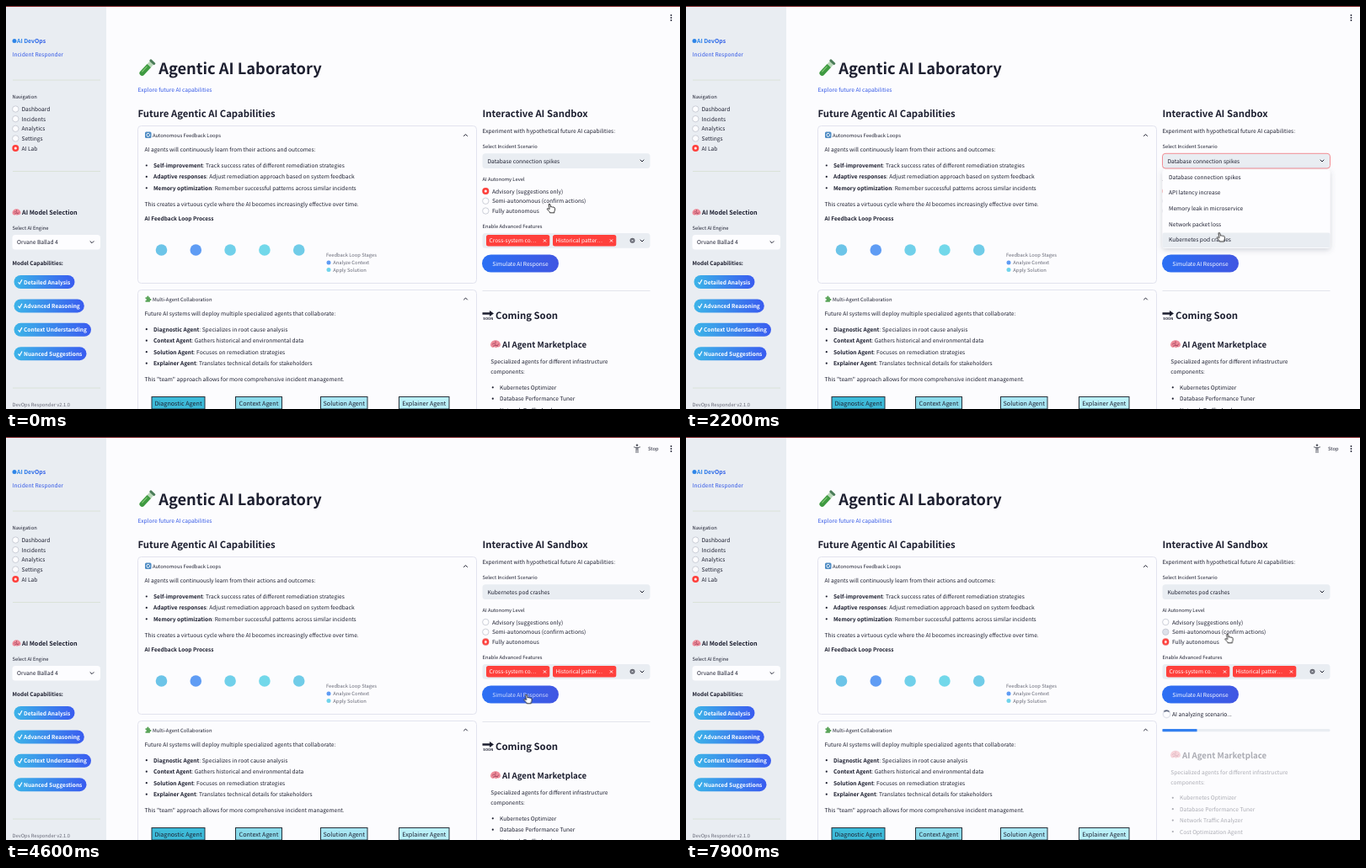
Animation, 800 px wide and 479 px high, one loop 8 s. Source, as an HTML page:

```html
<!DOCTYPE html>
<html lang="en">
<head>
<meta charset="utf-8">
<title>Agentic AI Laboratory</title>
<style>
html, body { margin: 0; height: 100%; overflow: hidden; background: #fcfcfe; }
svg { display: block; width: 100vw; height: 100vh; --s: 7.38; --k: var(--regular); }
text, tspan {
  font-family: "Noto Sans CJK JP", "Noto Sans CJK SC", "Noto Sans CJK", "Open Sans", sans-serif;
  font-size: calc(var(--s) * var(--k) * 1px);
  text-rendering: geometricPrecision;
  white-space: pre;
}
text { fill: #1d1f30; }
.b { font-weight: 700; --k: var(--bold); }
text.w { fill: #fff; }
text.link { fill: #3257e6; }
text.dim { fill: #666876; }
.mid { text-anchor: middle; }
.rule { stroke: #e3e5ec; stroke-width: 1; }
.rule.side { stroke: #dae2d8; }
.card { fill: none; stroke: #e2e3ee; }
.field { fill: #e9edf2; }
.line { fill: none; stroke: #1d1f30; stroke-width: 1; stroke-linecap: round; stroke-linejoin: round; }
.ring { fill: #fdfdff; stroke: #c0c4ce; stroke-width: .8; }

/* one shared 8 s timeline: 1% = 80 ms */
.step { animation: 8s step-end infinite; }
.menu { animation-name: menu; }
.focus { animation-name: focus; }
.before { animation-name: before; }
.after { animation-name: after; }
.caret { animation-name: caret; }
.last { animation-name: last; }
.first { animation-name: first; }
.pick { animation-name: pick; }
.hover { animation-name: hover; }
.stop { animation-name: stop; }
.person { animation-name: person; }
.bike { animation-name: bike; }
.press { animation-name: press; }
.divider { animation-name: divider; }
.coming { animation-name: coming; }
.market { animation-name: market; }
.busy { animation-name: busy; }
.bar { animation-name: bar; }
.arrow { animation-name: arrow; }
.hand { animation-name: hand; }
.stale { animation: stale 8s linear infinite; }
.fill { animation: fill 8s linear infinite; transform-box: fill-box; transform-origin: left; }
.spin { animation: spin .8s linear infinite; transform-box: view-box; transform-origin: 570.5px 329.5px; }
.cursor { animation: cursor 8s ease-in-out infinite; }

@keyframes menu { 0%, 33% { visibility: hidden } 7% { visibility: visible } }
@keyframes focus { 0%, 46% { visibility: hidden } 7% { visibility: visible } }
@keyframes before { 0% { visibility: visible } 33% { visibility: hidden } }
@keyframes after { 0% { visibility: hidden } 33% { visibility: visible } }
@keyframes caret { 0%, 13%, 25%, 39.5%, 46% { opacity: 0 } 7%, 19%, 31% { opacity: 1 } }
@keyframes first { 0% { opacity: 1 } 27% { opacity: 0 } }
@keyframes last { 0% { opacity: 0 } 27% { opacity: 1 } }
@keyframes pick { 0% { transform: none } 46% { transform: translateY(23.5px) } }
@keyframes hover { 0% { fill: #fdfdff } 94% { fill: #dde1ea } }
@keyframes stop { 0% { visibility: hidden } 55% { visibility: visible } }
@keyframes person { 0%, 74%, 90% { opacity: 1 } 64%, 80% { opacity: 0 } }
@keyframes bike { 0%, 74%, 90% { opacity: 0 } 64%, 80% { opacity: 1 } }
@keyframes press { 0%, 72% { opacity: 1 } 53% { opacity: .8 } }
@keyframes divider { 0% { visibility: visible } 63% { visibility: hidden } }
@keyframes coming {
  0% { transform: none }
  63% { transform: translateY(-30px) }
  72% { transform: translateY(-11.5px); visibility: visible }
  92% { transform: translateY(-11.5px); visibility: hidden }
}
@keyframes market {
  0% { transform: none }
  63% { transform: translateY(-30px) }
  72% { transform: translateY(-11px) }
  92% { transform: translateY(-24.5px) }
}
@keyframes stale { 0%, 77% { opacity: 1 } 81%, 100% { opacity: .36 } }
@keyframes busy { 0% { visibility: hidden } 72% { visibility: visible } }
@keyframes bar { 0% { visibility: hidden } 92% { visibility: visible } }
@keyframes fill { 0%, 92% { transform: scaleX(0) } 98.75% { transform: scaleX(.206) } 100% { transform: scaleX(.24) } }
@keyframes spin { to { transform: rotate(360deg) } }
@keyframes arrow { 0%, 43%, 74% { visibility: hidden } 33%, 62% { visibility: visible } }
@keyframes hand { 0%, 43%, 74% { visibility: visible } 33%, 62% { visibility: hidden } }
@keyframes cursor {
  0% { transform: translate(645px, 235px) }
  5%, 8% { transform: translate(690px, 186px) }
  20% { transform: translate(686px, 223px) }
  30%, 33% { transform: translate(625px, 276px) }
  38.75% { transform: translate(632px, 277px) }
  44%, 46% { transform: translate(604px, 242px) }
  52%, 58% { transform: translate(617.5px, 306px) }
  70% { transform: translate(624px, 263px) }
  83.75% { transform: translate(626px, 248px) }
  98.75% { transform: translate(642.5px, 234px) }
  100% { transform: translate(643px, 233px) }
}
</style>
</head>
<body>
<svg id="stage" viewBox="0 0 800 479" preserveAspectRatio="none"></svg>
<script>
const stage = document.getElementById('stage');

// Font scale per weight, so that sizes below are in the interface's own type size.
const pen = document.createElement('canvas').getContext('2d');
const family = '"Noto Sans CJK JP", "Noto Sans CJK SC", "Noto Sans CJK", "Open Sans", sans-serif';
function scale(weight, sample, ems) {
  pen.font = `${weight} 100px ${family}`;
  return ems * 100 / pen.measureText(sample).width;
}
stage.style.setProperty('--regular',
  scale(400, 'AI agents will continuously learn from their actions and outcomes:', 27.52));
stage.style.setProperty('--bold', scale(700, 'Agentic AI Laboratory', 9.435));

const INK = '#1d1f30', RED = '#ff403c', SMALL = 6.46;
const text = (x, y, str, size = 7.38, cls = '') =>
  `<text x="${x}" y="${y}" class="${cls}" style="--s:${size}">${str}</text>`;
const box = (x, y, w, h, r, attrs) =>
  `<rect x="${x}" y="${y}" width="${w}" height="${h}" rx="${r}" ${attrs}/>`;
const dot = (x, y, r, attrs = `fill="${INK}"`) => `<circle cx="${x}" cy="${y}" r="${r}" ${attrs}/>`;
const rule = (x, y, w, cls = '') => `<path class="rule ${cls}" d="M${x} ${y}h${w}"/>`;
const chevron = (x, y, dir = 1) =>
  `<path class="line" d="M${x - 2} ${y - dir}l2 ${2 * dir}l2 ${-2 * dir}"/>`;
const cross = (x, y, r, color) =>
  `<path d="M${x - r} ${y - r}l${2 * r} ${2 * r}m0 ${-2 * r}l${-2 * r} ${2 * r}" stroke="${color}" stroke-width=".9"/>`;
const ring = (x, y, cls = '') => dot(x, y, 3.7, `class="ring ${cls}"`);
const chosen = (x, y) => dot(x, y, 4, `fill="${RED}"`) + dot(x, y, 1.5, 'fill="#fff"');
const bullet = (x, y, lead, rest) =>
  dot(x - 8.2, y - 2.5, 1.1) + text(x, y, `<tspan class="b">${lead}</tspan>${rest}`);
const each = (list, fn) => list.map(fn).join('');
const step = (cls, body) => `<g class="step ${cls}">${body}</g>`;

const brain = (x, y, r) => `<g transform="translate(${x} ${y}) scale(${r / 6})">
  <path d="M-6 1C-6-3-3-5 0-5S6-3 6 1Q5 4 2 3Q1 5-1 3Q-5 5-6 1Z" fill="#ee8c9a"/>
  <path d="M-4 0Q-2-3 0 0T4-1M-3 2Q0 0 3 2M0-4V-1" fill="none" stroke="#a84a62" stroke-width=".9"/></g>`;

const defs = `<defs>
  <linearGradient id="badge"><stop stop-color="#3cb4e8"/><stop offset="1" stop-color="#3a5cf0"/></linearGradient>
  <linearGradient id="button"><stop stop-color="#2b70f4"/><stop offset="1" stop-color="#4056e2"/></linearGradient>
  <linearGradient id="brand"><stop stop-color="#2b8cec"/><stop offset="1" stop-color="#2c55e6"/></linearGradient>
  <filter id="shadow" x="-10%" y="-10%" width="120%" height="130%">
    <feDropShadow dx="0" dy="2" stdDeviation="3" flood-color="#50536a" flood-opacity=".25"/></filter>
</defs>`;

function sidebar() {
  const pages = ['Dashboard', 'Incidents', 'Analytics', 'Settings', 'AI Lab'];
  const badges = [['Detailed Analysis', 72], ['Advanced Reasoning', 83.3],
    ['Context Understanding', 91.5], ['Nuanced Suggestions', 86]];
  return box(0, 0, 119, 479, 0, 'class="field"')
    + dot(10, 41.5, 2.5, 'fill="#2f86e8"')
    + `<g>${text(13, 44, 'AI DevOps', 7.7, 'b').replace('--s', 'fill:url(#brand);--s')}</g>`
    + text(7.5, 60.3, 'Incident Responder', 7.38, 'link')
    + each([88, 196.5, 454], y => rule(8, y, 104, 'side'))
    + text(7.5, 110.3, 'Navigation', SMALL)
    + each(pages, (name, i) => {
        const y = 122.5 + i * 11.65;
        return (i < 4 ? ring(11.3, y) : chosen(11.3, y)) + text(18.5, y + 2.5, name);
      })
    + brain(12.5, 245.5, 5) + text(19, 248.4, 'AI Model Selection', 8.15, 'b')
    + text(7.5, 266, 'Select AI Engine', SMALL)
    + box(7.5, 272, 104.5, 17.5, 3.5, 'fill="#fdfdff"')
    + text(13, 283.2, 'Orvane Ballad 4') + chevron(102, 280.7)
    + text(7.5, 308, 'Model Capabilities:', 7.22, 'b')
    + each(badges, ([name, w], i) => {
        const y = 328 + i * 28.4;
        return box(9.5, y - 8, w, 16, 8, 'fill="url(#badge)"')
          + `<path d="M14.5 ${y + .3}l1.7 2l2.8-5" fill="none" stroke="#fff" stroke-width="1.2"/>`
          + text(21, y + 2.6, name, 7.4, 'b w');
      })
    + text(7.5, 476, 'DevOps Responder v2.1.0', SMALL, 'dim');
}

function capabilities() {
  const tube = `<g transform="translate(167 74) rotate(43)">
    <rect x="-3" y="-10" width="6" height="21" rx="3" fill="#b9d8b8"/>
    <path d="M-3-4H3V8a3 3 0 0 1-6 0Z" fill="#3f9a42"/>
    <rect x="-4" y="-11.5" width="8" height="3" rx="1" fill="#4a7c58"/>
    <path d="M-1.2-2V7" stroke="#8ed07c"/></g>`;
  const loop = `<rect x="165" y="149.5" width="7.5" height="7.5" rx="1.5" fill="#4f8cc4"/>
    <path d="M166.8 153.8a2 2 0 0 1 3.6-1.5M170.6 152.8a2 2 0 0 1-3.6 1.6" fill="none" stroke="#fff"/>`;
  const puzzle = `<path d="M165.5 346.3h1.8q-.5-1.7 1.1-1.7t1.1 1.7h1.4v1.8q1.6-.5 1.6.9t-1.6 1v1.8h-5.4v-1.8q1.4 0 1.4-1t-1.4-.9Z" fill="#5ba45a"/>`;
  const nodes = ['#6cc4e8', '#5f9cf4', '#70d0ea', '#72d8ea', '#70cce8'];
  const agents = [['Diagnostic', 173, 63, '#3dbbd9'], ['Context', 272.5, 55, '#8adaea'],
    ['Solution', 373.5, 55.5, '#a8e6f3'], ['Explainer', 466.5, 59.5, '#baf0f8']];
  return tube + text(181.2, 80.7, 'Agentic AI Laboratory', 20.53, 'b')
    + text(156.5, 102, 'Explore future AI capabilities', 7.38, 'link')
    + text(156.5, 131.9, 'Future Agentic AI Capabilities', 12.68, 'b')
    + box(156.5, 142.5, 402, 187, 4, 'class="card"')
    + loop + text(174, 155.7, 'Autonomous Feedback Loops', 6.55) + chevron(545.5, 153.5, -1)
    + text(164.5, 173, 'AI agents will continuously learn from their actions and outcomes:')
    + bullet(175, 192, 'Self-improvement', ': Track success rates of different remediation strategies')
    + bullet(175, 205.4, 'Adaptive responses', ': Adjust remediation approach based on system feedback')
    + bullet(175, 218.8, 'Memory optimization', ': Remember successful patterns across similar incidents')
    + text(164.5, 238.3, 'This creates a virtuous cycle where the AI becomes increasingly effective over time.')
    + text(164.5, 255.2, 'AI Feedback Loop Process', 7.3, 'b')
    + each(nodes, (c, i) => dot(184.5 + i * 40.8, 290, 6.8, `fill="${c}"`))
    + text(380, 298.4, 'Feedback Loop Stages', 6.45, 'dim')
    + dot(383, 305, 2.5, 'fill="#5f9cf4"') + text(388.3, 307.3, 'Analyze Context', 6.45, 'dim')
    + dot(383, 313.6, 2.5, 'fill="#70d4ec"') + text(388.3, 316, 'Apply Solution', 6.45, 'dim')
    + box(156.5, 337.5, 402, 160, 4, 'class="card"')
    + puzzle + text(174, 350.6, 'Multi-Agent Collaboration', 6.55) + chevron(545.5, 348, -1)
    + text(164.5, 368, 'Future AI systems will deploy multiple specialized agents that collaborate:')
    + bullet(175, 386.7, 'Diagnostic Agent', ': Specializes in root cause analysis')
    + bullet(175, 400.2, 'Context Agent', ': Gathers historical and environmental data')
    + bullet(175, 413.7, 'Solution Agent', ': Focuses on remediation strategies')
    + bullet(175, 427.2, 'Explainer Agent', ': Translates technical details for stakeholders')
    + text(164.5, 446.3, 'This "team" approach allows for more comprehensive incident management.')
    + each(agents, ([name, x, w, c]) =>
        box(x, 464.5, w, 14.5, 0, `fill="${c}" stroke="#26303a"`)
        + text(x + w / 2, 474.8, name + ' Agent', 8, 'mid'));
}

function sandbox() {
  const levels = ['Advisory (suggestions only)', 'Semi-autonomous (confirm actions)', 'Fully autonomous'];
  const tags = [['Cross-system co…', 570], ['Historical patter…', 649]];
  const caret = x => box(x, 179.3, .9, 9.5, 0, `fill="${INK}" class="step caret"`);
  return text(565.5, 131.9, 'Interactive AI Sandbox', 12.7, 'b')
    + text(565.5, 151, 'Experiment with hypothetical future AI capabilities:')
    + text(565.5, 169.2, 'Select Incident Scenario', SMALL)
    + box(565.5, 175.3, 199, 17.7, 3.5, 'class="field"')
    + box(565.5, 175.3, 199, 17.7, 3.5, 'fill="none" stroke="#f28088" stroke-width=".9" class="step focus"')
    + step('before', text(571.5, 186.7, 'Database connection spikes') + caret(659))
    + step('after', text(571.5, 186.7, 'Kubernetes pod crashes') + caret(647))
    + chevron(755, 184)
    + text(565.5, 208.3, 'AI Autonomy Level', SMALL)
    + each(levels, (name, i) => {
        const y = 220 + i * 11.75;
        return ring(569.3, y, i === 1 ? 'step hover' : '') + text(577, y + 2.5, name);
      })
    + step('pick', chosen(569.3, 220))
    + text(565.5, 263.6, 'Enable Advanced Features', SMALL)
    + box(565.5, 270, 199, 17.7, 3.5, 'class="field"')
    + each(tags, ([name, x]) => box(x, 272, 75.3, 13.6, 2.5, `fill="${RED}"`)
        + text(x + 3.5, 281.4, name, 7.3, 'w') + cross(x + 69.5, 279, 1.6, '#fff'))
    + dot(743.5, 278.8, 3, 'fill="#63656f"') + cross(743.5, 278.8, 1.1, '#e9edf2') + chevron(755, 279)
    + box(565, 295.5, 91, 21, 10.5, 'fill="url(#button)"')
    + step('press', text(610.5, 308.7, 'Simulate AI Response', 7.4, 'w mid'))
    + rule(565.5, 338.5, 199, 'step divider');
}

function upcoming() {
  const items = ['Kubernetes Optimizer', 'Database Performance Tuner', 'Network Traffic Analyzer', 'Cost Optimization Agent'];
  const soon = `<path d="M565.5 364.2h8.5v-2.2l5 3.5l-5 3.5v-2.2h-8.5Z" fill="${INK}"/>`
    + text(572.3, 373.3, 'SOON', 4.6, 'b mid');
  return `<g class="stale">`
    + step('coming', soon + text(581, 371.9, 'Coming Soon', 12.74, 'b'))
    + step('market', brain(581, 402.3, 6)
      + text(589, 406.2, 'AI Agent Marketplace', 10.85, 'b')
      + text(575.3, 425, 'Specialized agents for different infrastructure')
      + text(575.3, 437.2, 'components:')
      + each(items, (name, i) => bullet(586, 455.8 + i * 13.4, '', name)))
    + '</g>';
}

function status() {
  const person = `<circle cx="749" cy="9.7" r="1.3" fill="#555762" stroke="none"/>
    <path d="M745 11.8l3 .8h2l3-.8M748 12.6V19M750 12.6V19M749 12.6V15.5"/>`;
  const bike = dot(745.6, 16.8, 2.3, '') + dot(752.4, 16.8, 2.3, '')
    + `<circle cx="750.3" cy="9.7" r="1.1" fill="#555762" stroke="none"/>
    <path d="M753 13h-2l-1.8-1.8l-2.4 2.2l2.2 1.4v2.6"/>`;
  const spinner = dot(570.5, 329.5, 4.2, 'fill="none" stroke="#e3e5ec" stroke-width="1.4"')
    + '<path class="spin" d="M570.5 325.3a4.2 4.2 0 0 1 4.2 4.2" fill="none" stroke="#34405e" stroke-width="1.4"/>';
  return each([11, 14, 17], y => dot(789.5, y, .9))
    + step('stop', `<g fill="none" stroke="#555762" stroke-width=".9">
        ${step('person', person)}${step('bike', bike)}</g>` + text(762, 16.1, 'Stop', SMALL))
    + step('busy', spinner + text(577, 332.2, 'AI analyzing scenario...', 7.5))
    + step('bar', box(565.5, 347, 199, 3.3, 1.6, 'class="field"')
      + box(565.5, 347, 199, 3.3, 1.6, 'fill="#3380f0" class="fill"'));
}

function menu() {
  const options = ['Database connection spikes', 'API latency increase', 'Memory leak in microservice',
    'Network packet loss', 'Kubernetes pod crashes'];
  return step('menu', box(565.5, 194.5, 199, 93.5, 3.5, 'fill="#fdfdff" filter="url(#shadow)"')
    + box(565.5, 194.5, 199, 17.7, 2, 'class="field step first"')
    + box(565.5, 269.5, 199, 17.7, 2, 'class="field step last"')
    + each(options, (name, i) => text(573, 205.7 + i * 18.65, name)));
}

const cursor = `<g class="cursor">
  <path class="step arrow" d="M0 0V10L2.3 7.9L4 11.6L5.7 10.8L4.1 7.3H7.2Z" fill="#111" stroke="#fff" stroke-width=".7"/>
  <path class="step hand" d="M-.9.8Q0-.6.9.8L1.7 4Q2.6 3.2 3.4 4.1Q4.3 3.4 5 4.4Q6.2 4 6.5 5.3Q7 8 5.8 9.2V10.8H.6Q.4 9.4-1.2 8.2L-2.9 6.3Q-2.3 4.9-.6 6.2L.2 6.4Z"
    fill="#fff" stroke="#222" stroke-width=".9" stroke-linejoin="round"/></g>`;

stage.innerHTML = defs + sidebar() + capabilities() + sandbox() + upcoming() + status()
  + menu() + box(0, 0, 800, 1, 0, 'fill="#82282c"') + cursor;
</script>
</body>
</html>
```
